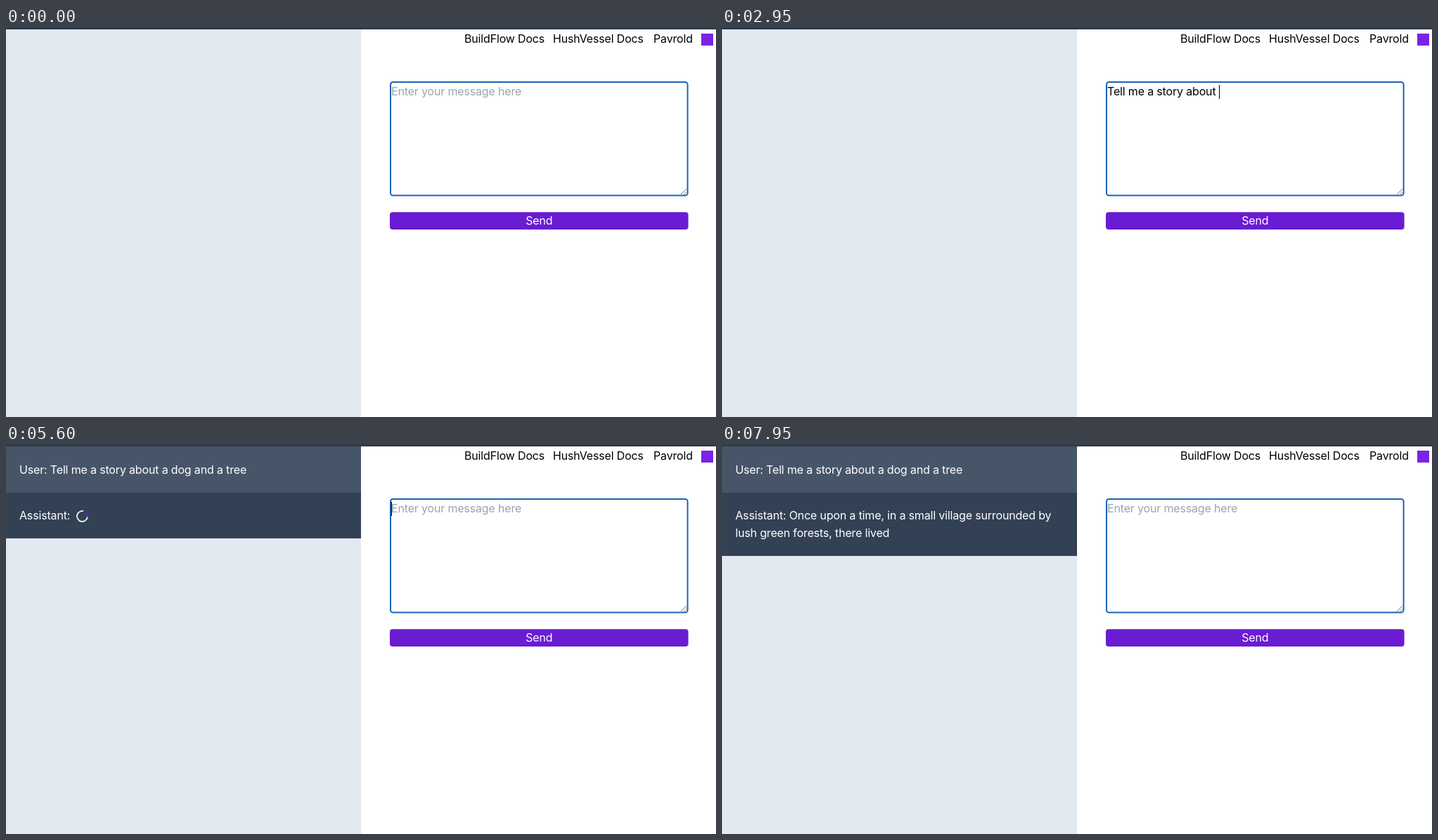
An HTML page for the animation above (8 s loop, 1010 px wide and 554 px high).

```html
<!DOCTYPE html>
<html lang="en">
<head>
<meta charset="utf-8">
<title>Chat demo</title>
<style>
  html, body { margin: 0; width: 100%; height: 100%; overflow: hidden; background: #fff; }
  body {
    position: relative;
    font: 400 16px/24.6px Inter, "Liberation Sans", sans-serif;
    letter-spacing: -0.165px;
    color: #000;
  }
  .abs, .row { position: absolute; box-sizing: border-box; white-space: pre; }
  .bar { left: 0; top: 0; width: 100%; height: 2px; background: #2c3a4d; }
  .chat { left: 0; top: 2px; width: 505px; bottom: 0; background: #e2e8f0; }
  .row { left: 0; width: 505px; padding: 20.5px 19px; color: #fff; }
  .user { top: 0; height: 65.6px; background: #475569; }
  .bot { top: 65.6px; min-height: 65.6px; background: #334155; }
  .nav { top: 2.7px; }
  .mark { left: 989px; top: 8px; width: 17px; height: 17px; background: #7c22e4; }
  .form { left: 0; top: 0; }
  .line { left: 548px; top: 78.3px; }
  .hint { color: #9ca3af; }
  .caret {
    display: inline-block; width: 1px; height: 20px; margin-right: -1px;
    vertical-align: -4.5px; background: #000;
  }
  .send { left: 546px; top: 262.3px; width: 424.6px; color: #fff; text-align: center; }
  .spin {
    display: inline-block; box-sizing: border-box; width: 17px; height: 17px;
    margin-left: 4px; vertical-align: -3.5px; border-radius: 50%;
    border: 2px solid #e5e7eb; border-top-color: #6a1cd3;
  }
</style>
</head>
<body>
  <div class="abs chat">
    <div id="talk">
      <div class="row user">User: Tell me a story about a dog and a tree</div>
      <div class="row bot">Assistant: <span id="reply"></span><span class="spin" id="spin"></span></div>
    </div>
  </div>
  <div class="abs bar"></div>
  <div class="abs nav" style="left:652px">BuildFlow Docs</div>
  <div class="abs nav" style="left:778px">HushVessel Docs</div>
  <div class="abs nav" style="left:921px">Pavrold</div>
  <div class="abs mark"></div>
  <svg class="abs form" width="1010" height="300" fill="none">
    <rect x="547" y="77" width="422.6" height="161.6" rx="3.5" stroke="#1a62b5" stroke-width="2"/>
    <path d="M960 237 L968 229 M964.5 237 L968 233.5" stroke="#777"/>
    <rect x="546" y="262.3" width="424.6" height="24.6" rx="4" fill="#6a1cd3"/>
  </svg>
  <div class="abs line hint" id="hint">Enter your message here</div>
  <div class="abs line"><span id="typed"></span><span class="caret" id="caret"></span></div>
  <div class="abs send">Send</div>

<script>
const LOOP = 8000, SENT = 5450, ANSWER = 6000, TOKEN_MS = 118;
const BLINK = 1000, SPIN = 1000;
const PROMPT = "Tell me a story about a dog and a tree";
const TOKENS = ["Once", " upon", " a", " time", ",", " in", " a", " small", " village",
  " surrounded", " by", "\nlush", " green", " forests", ",", " there", " lived"];
// [time, characters typed]
const KEYS = [[200, 0], [1590, 11], [2890, 22], [4340, 33], [5150, 38]];

const el = id => document.getElementById(id);
const talk = el("talk"), reply = el("reply"), spin = el("spin");
const hint = el("hint"), typed = el("typed"), caret = el("caret");

function show(node, on) {
  node.style.visibility = on ? "inherit" : "hidden";
}

function setText(node, text) {
  if (node.textContent !== text) node.textContent = text;
}

function typedCount(t) {
  if (t >= SENT || t < KEYS[0][0]) return 0;
  for (let i = 1; i < KEYS.length; i++) {
    const [t0, n0] = KEYS[i - 1], [t1, n1] = KEYS[i];
    if (t < t1) return Math.floor(n0 + (n1 - n0) * (t - t0) / (t1 - t0));
  }
  return PROMPT.length;
}

function draw(t) {
  const count = typedCount(t);
  const sent = t >= SENT;
  setText(typed, PROMPT.slice(0, count));
  show(hint, count === 0);
  // solid while typing, blinking once the box is cleared
  show(caret, sent ? (t - SENT) % BLINK < BLINK / 2 : count > 0);

  show(talk, sent);
  const tokens = t < ANSWER ? 0 : Math.floor((t - ANSWER) / TOKEN_MS) + 1;
  setText(reply, TOKENS.slice(0, tokens).join(""));
  spin.style.display = tokens ? "none" : "";
  spin.style.transform = `rotate(${(t - SENT) / SPIN * 360}deg)`;
}

const start = performance.now();
function tick() {
  draw((performance.now() - start) % LOOP);
  requestAnimationFrame(tick);
}
draw(0);
requestAnimationFrame(tick);
</script>
</body>
</html>
```
